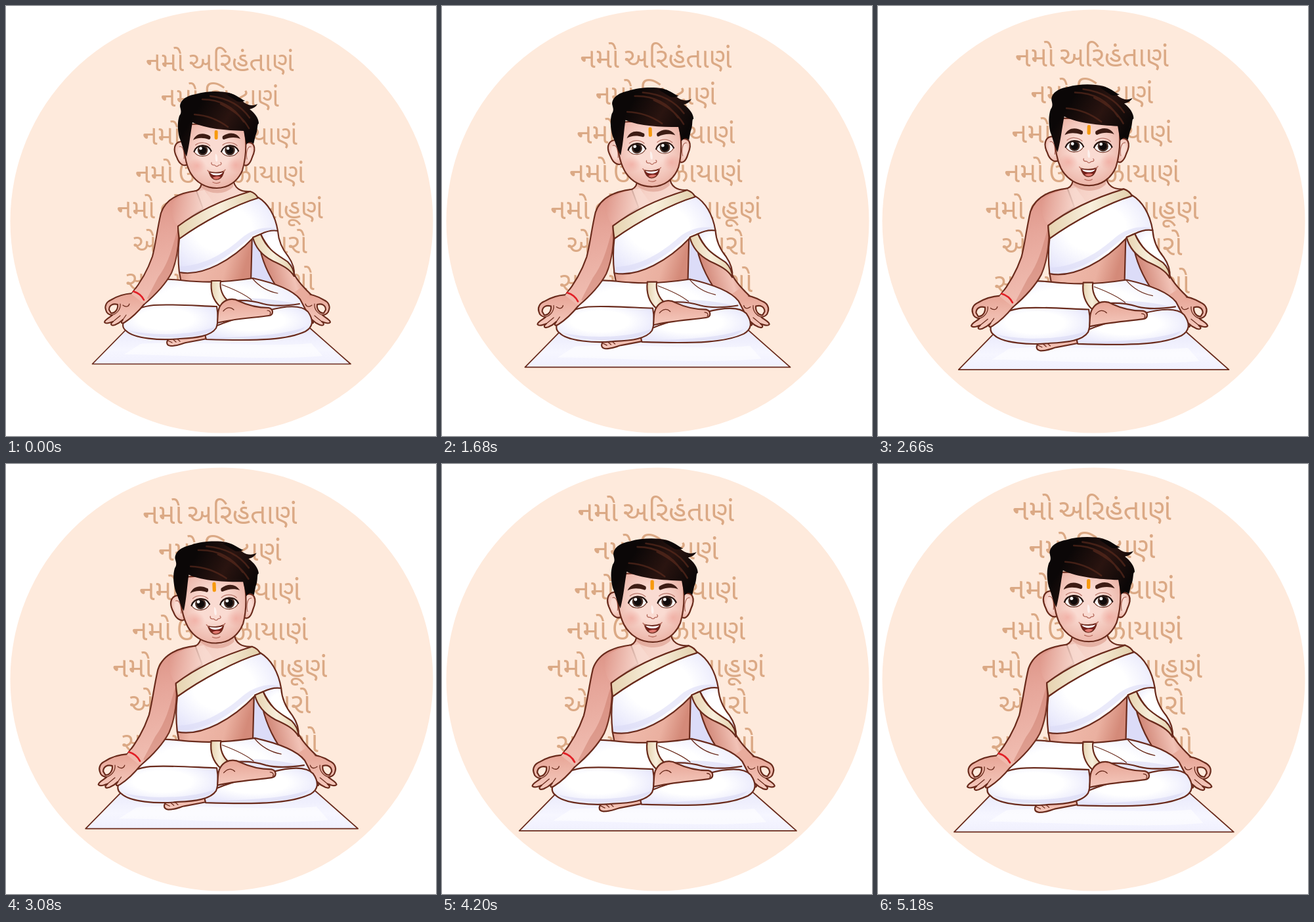
Animation, 655 px wide and 654 px high, one loop 5250 ms. Source, as an HTML page:

```html
<!DOCTYPE html>
<html lang="gu">
<head>
<meta charset="utf-8">
<title>Meditation</title>
<style>
  html, body { margin: 0; width: 100%; height: 100%; overflow: hidden; background: #fff; }
  svg { display: block; width: 100%; height: 100%; }
  #verses { font: 500 41px "Noto Sans Gujarati", "Noto Sans", sans-serif; word-spacing: -.13em; fill: #dba985; text-anchor: middle; }
  #figure { stroke: #6a2b1c; stroke-width: 2.1; stroke-linejoin: round; stroke-linecap: round; }
  .line { fill: none; }
  .thin { fill: none; stroke-width: 1.2; }
  .soft { stroke: none; }
  .cloth { fill: url(#cloth); }
  .beige { fill: url(#beige); }
  .streak { fill: none; stroke: #5d2c1e; stroke-width: 2.4; opacity: .65; }
</style>
</head>
<body>
<svg viewBox="0 0 655 654">
  <defs>
    <radialGradient id="cloth" cx=".45" cy=".42" r=".65">
      <stop offset=".45" stop-color="#fff"/><stop offset="1" stop-color="#e4e4fb"/>
    </radialGradient>
    <linearGradient id="mat" x2="0" y2="1">
      <stop stop-color="#e9e9fb"/><stop offset=".6" stop-color="#f6f6ff"/><stop offset="1" stop-color="#f0f0fe"/>
    </linearGradient>
    <linearGradient id="beige">
      <stop stop-color="#e6d3b0"/><stop offset=".5" stop-color="#f8efdc"/><stop offset="1" stop-color="#e3d0ac"/>
    </linearGradient>
    <linearGradient id="armL" x2=".15" y2="1">
      <stop stop-color="#d98d7f"/><stop offset=".4" stop-color="#e6a599"/><stop offset="1" stop-color="#f1bfb3"/>
    </linearGradient>
    <linearGradient id="armR" x1="1" x2=".1" y1=".3" y2=".6">
      <stop stop-color="#c06a5a"/><stop offset=".45" stop-color="#f2c3b7"/><stop offset="1" stop-color="#cb7c6c"/>
    </linearGradient>
    <linearGradient id="torso" x2="1" y2=".2">
      <stop stop-color="#cf8070"/><stop offset=".35" stop-color="#efb9aa"/><stop offset=".75" stop-color="#eab0a0"/><stop offset="1" stop-color="#d48a79"/>
    </linearGradient>
    <linearGradient id="chest" x2="1" y2=".3">
      <stop stop-color="#d98d7e"/><stop offset=".5" stop-color="#f6d2c7"/><stop offset="1" stop-color="#fae0d7"/>
    </linearGradient>
    <linearGradient id="glow">
      <stop stop-color="#f8d9cf" stop-opacity="0"/><stop offset=".8" stop-color="#f8d9cf"/>
    </linearGradient>
    <radialGradient id="face" cy=".45" r=".58">
      <stop offset=".4" stop-color="#fadbd2"/><stop offset="1" stop-color="#ebb2a5"/>
    </radialGradient>
    <radialGradient id="blush">
      <stop stop-color="#ee958b" stop-opacity=".45"/><stop offset="1" stop-color="#ee958b" stop-opacity="0"/>
    </radialGradient>
    <linearGradient id="hand" x2="0" y2="1">
      <stop stop-color="#e7a596"/><stop offset="1" stop-color="#f5cabe"/>
    </linearGradient>
    <linearGradient id="hair" x2="1" y2=".5">
      <stop offset=".3" stop-color="#0b0707"/><stop offset=".65" stop-color="#2a1410"/><stop offset="1" stop-color="#0b0707"/>
    </linearGradient>
    <g id="palm">
      <path fill="url(#hand)" d="M192 437C178 438 168 442 160 447C153 450 150 456 152 462C153 467 157 470 162 470C158 474 150 477 150 481C152 484 158 482 163 480C158 484 160 487 166 485C171 483 175 480 178 477C174 482 176 484 181 481C192 474 203 463 211 453"/>
      <path fill="#feeadc" d="M157 462C157 455 163 452 170 454C171 461 166 468 160 467Z"/>
      <path class="thin" d="M162 470C169 468 175 461 174 453M163 480L174 471M178 477L183 470M178 455C183 459 187 457 188 453"/>
    </g>
    <g id="eye">
      <path fill="#fff" stroke-width="1" d="M-13 2C-10 -9 8 -11 13 1C8 11 -7 12 -13 2Z"/>
      <circle class="soft" r="7.8" fill="#4a3129"/>
      <circle class="soft" r="5.6" fill="#100b0b"/>
      <circle class="soft" cx="-3" cy="-3" r="2.3" fill="#fff"/>
      <path class="line" stroke="#24130f" stroke-width="2.2" d="M-13 2C-10 -9 8 -11 13 1"/>
      <path class="thin" stroke="#b9766a" d="M-11 -8C-5 -13 5 -13 11 -7"/>
    </g>
  </defs>

  <circle cx="328.5" cy="327.5" r="322" fill="#feeadc"/>
  <g id="verses"></g>

  <g id="figure">
    <path fill="url(#mat)" stroke-width="1.7" d="M131.5 544.5H525L462 489H186Z"/>
    <path class="soft" fill="#fff" opacity=".6" d="M205 514C270 508 400 520 465 513L482 532C400 540 260 530 180 530Z"/>

    <!-- cloth behind the far arm -->
    <path fill="#dcdcf8" stroke-width="1.3" d="M372 350L390 358C396 385 408 410 432 437L373 425Z"/>

    <!-- torso and neck -->
    <path fill="url(#chest)" d="M298 262C299 272 297 278 290 281C272 286 255 292 246 304L258 350L385 300L372 282C358 283 347 278 346 262Z"/>
    <path fill="url(#torso)" d="M262 350L264 405L267 421H373L375 345Z"/>
    <path class="soft" fill="#d58f80" opacity=".5" d="M299 268C312 282 334 282 346 267V275C333 288 311 287 298 276Z"/>

    <!-- far arm -->
    <path fill="url(#armR)" d="M384 350C386 375 396 402 410 424C420 437 430 449 437 457L468 442C456 431 445 420 439 408L418 370Z"/>
    <use href="#palm" transform="matrix(-1 0 0 1 644 0)"/>
    <path class="soft" fill="#e9ac9d" d="M432 440L437 456L456 446L463 439L450 428Z"/>

    <!-- dhoti -->
    <path class="cloth" d="M230 418C248 413 265 418 290 419C320 421 350 418 376 414C403 420 435 430 448 446L458 465L440 494L190 490L199 462C214 446 222 432 230 418Z"/>
    <path class="soft" fill="#dedef7" opacity=".7" d="M338 449C375 440 415 447 447 454C420 456 390 466 370 466Z"/>
    <path class="line" d="M340 449C356 447 376 448 392 453C408 457 428 456 447 453"/>
    <path class="thin" d="M329 424C345 430 362 437 374 447M376 415C386 427 399 434 414 437"/>
    <path class="beige" d="M313 418H327C325 430 330 442 339 449L326 457C316 448 311 435 313 418Z"/>

    <!-- legs and feet -->
    <path fill="url(#hand)" d="M307 490C290 499 268 502 252 504C243 508 243 516 251 517C262 517 266 514 274 512L306 506Z"/>
    <path class="thin" d="M247 509L253 512M252 505L259 511M258 504L265 510"/>
    <path class="cloth" d="M305 507C302 499 304 494 309 491C335 480 365 470 400 463C425 456 450 454 460 465C469 478 468 488 456 495C430 507 390 510 305 507Z"/>
    <path class="soft" fill="#dadaf6" opacity=".6" d="M312 505C360 503 420 502 456 488C440 506 385 509 312 505Z"/>
    <path class="cloth" d="M197 462C179 472 173 487 183 494C195 506 235 509 265 506C290 505 312 502 320 490C324 480 323 468 321 457C290 456 250 453 225 455C212 456 203 460 197 462Z"/>
    <path class="soft" fill="#dadaf6" opacity=".6" d="M186 493C220 502 280 502 319 488C310 506 220 511 186 493Z"/>
    <path fill="url(#hand)" d="M322 482C323 470 322 462 327 455C333 446 345 443 355 449C370 456 385 459 400 459C408 461 408 470 400 471C380 474 345 476 322 482Z"/>
    <path class="thin" d="M331 464C336 458 342 457 347 462M398 463C402 463 404 466 402 469"/>

    <!-- near arm -->
    <path fill="url(#armL)" d="M290 281C264 284 243 294 236 315C230 341 228 362 223 381C215 404 204 422 191 438L210 454C228 439 244 421 252 406C259 390 262 372 263 352L262 335L300 308Z"/>
    <path class="soft" fill="#bd6555" opacity=".35" d="M262 338C254 362 250 388 232 412L212 450C230 436 246 418 252 405C259 389 262 372 263 352Z"/>
    <path class="soft" fill="url(#glow)" d="M302 280C282 283 264 287 252 300C252 318 256 331 263 334L318 302Z"/>
    <use href="#palm"/>
    <path class="soft" fill="#efbaad" d="M191 438L210 453L217 446L198 430Z"/>
    <path class="line" stroke="#e21f26" stroke-width="2.6" d="M194 434C201 436 207 441 210 447"/>

    <!-- upper cloth -->
    <path class="cloth" d="M264 354C300 328 350 302 384 291C399 300 410 318 414 342C401 342 388 346 377 352C345 386 300 412 264 405C262 388 262 370 264 354Z"/>
    <path class="soft" fill="#dcdcf7" opacity=".6" d="M266 402C310 404 345 376 376 349C389 343 401 341 412 339C395 334 375 340 360 352C335 374 305 394 266 396Z"/>
    <path class="beige" d="M264 354C263 347 262 341 262 335C296 309 336 293 372 282C378 284 382 288 384 292C350 302 300 328 264 354Z"/>
    <path class="cloth" d="M388 347C398 342 408 341 414 342C415 357 420 369 430 381C437 391 440 400 439 411C430 395 403 378 388 347Z"/>
    <path class="beige" d="M376 352L388 347C398 372 416 380 429 389C436 396 439 404 439 411C431 398 417 393 405 387C390 379 380 368 376 352Z"/>

    <g id="head">
      <path fill="url(#face)" d="M274 207C257 203 253 216 260 230C264 242 272 245 279 240Z"/>
      <path fill="url(#face)" d="M363 209C378 204 382 215 375 230C371 243 365 245 360 240Z"/>
      <path class="thin" stroke="#b26a5c" d="M264 214C269 212 272 221 271 232M373 214C368 213 365 223 367 233"/>
      <path fill="url(#face)" d="M272 180C269 210 272 236 280 252C289 269 305 277 321 277C338 277 353 267 360 250C366 230 367 205 362 178Z"/>
      <ellipse class="soft" cx="291" cy="243" rx="14" ry="12" fill="url(#blush)"/>
      <ellipse class="soft" cx="350" cy="242" rx="13" ry="12" fill="url(#blush)"/>

      <path class="soft" fill="url(#hair)" d="M275 229C269 218 268 209 264 200C261 187 261 176 264 167C268 162 266 158 265 153C265 142 277 136 289 134C305 129 326 129 340 132C350 135 356 141 363 147C370 152 377 152 383 149C380 154 376 156 371 157C379 163 385 171 385 179C382 178 384 190 380 197L377 210C372 205 369 207 366 211L362 190C335 189 305 187 284 177C281 192 280 209 275 229Z"/>
      <path class="soft" fill="#0b0707" d="M335 134C346 130 356 141 364 144C359 146 355 146 352 145Z"/>
      <path class="streak" d="M299 142C325 142 347 153 362 176M311 137C336 140 357 150 371 170M287 165C303 166 322 172 338 184M327 149C345 158 360 168 370 186"/>

      <path class="soft" fill="#3d1c14" d="M285 204C290 193 301 192 311 198C312 201 311 203 309 203C300 200 292 200 285 204Z"/>
      <path class="soft" fill="#3d1c14" d="M357 202C351 192 340 191 330 198C329 201 330 203 332 203C341 199 350 199 357 202Z"/>
      <rect class="soft" x="317.6" y="189" width="5" height="14" rx="2.2" fill="#f79a0e"/>
      <use href="#eye" x="299.5" y="219.5"/>
      <use href="#eye" x="341" y="219.5"/>
      <path class="thin" stroke="#b5695b" d="M313 238C312 242 316 242 318 242C320 245 323 244 324 242C328 242 329 240 327 238"/>
      <path class="soft" fill="#fff" opacity=".6" d="M319 225C321 224 323 231 322 236C320 238 318 236 319 225Z"/>
      <path fill="#74201b" stroke-width="1.3" d="M309 252C315 254 325 254 332 251C330 261 325 264 320 264C315 264 311 259 309 252Z"/>
      <path class="soft" fill="#fff" d="M311 253.5C318 255 325 255 330 253C328 259 314 259 311 253.5Z"/>
      <path class="soft" fill="#dd766d" d="M315 261C318 259 324 259 327 260C324 264 318 265 315 261Z"/>
      <path class="thin" stroke="#b5695b" d="M307 250L310 253M331 252L334 249M315 268C319 270 323 270 326 268"/>
    </g>
  </g>
</svg>
<script>
  const LOOP = 5250, STEP = 70, SWAY = 1400;
  const rows = [
    ["નમો અરિહંતાણં", 99], ["નમો સિદ્ધાણં", 153], ["નમો આયરિયાણં", 211],
    ["નમો ઉવજ્ઝાયાણં", 269], ["નમો લોએ સવ્વસાહૂણં", 323], ["એસો પંચ નમુક્કારો", 376],
    ["સવ્વ પાવપ્પણાસણો", 432], ["પઢમં હવઈ મંગલં", 543]
  ];
  const byId = id => document.getElementById(id);
  const verses = byId("verses"), figure = byId("figure"), head = byId("head");

  const lines = rows.map(([text, y]) => {
    const line = document.createElementNS("http://www.w3.org/2000/svg", "text");
    line.textContent = text;
    line.setAttribute("x", 326);
    line.setAttribute("y", y);
    return verses.appendChild(line);
  });

  // One type size for all verses, whichever Gujarati font is present
  const total = lines.slice(0, 7).reduce((sum, line) => sum + line.getComputedTextLength(), 0);
  verses.style.fontSize = 41 * 1766 / total + "px";

  const zoom = (el, x, y, k) =>
    el.setAttribute("transform", `translate(${x} ${y}) scale(${k}) translate(${-x} ${-y})`);

  // Part of a slow sine breath, from 0 to 1
  const breath = p => (Math.sin(2.3 * p - 1) + Math.sin(1)) / (Math.sin(1.3) + Math.sin(1));

  function draw(now) {
    const t = Math.floor(now % LOOP / STEP) * STEP;
    const p = t / (LOOP - STEP);
    zoom(verses, 326, 300, 1 + .071 * p);
    zoom(figure, 320, 360, 1 + .082 * breath(p));
    const tilt = -.8 + 1.75 * Math.cos(2 * Math.PI * (t / SWAY - .83));
    head.setAttribute("transform", `rotate(${tilt} 321 276)`);
  }

  let start;
  function tick(now) {
    start ??= now;
    draw(now - start);
    requestAnimationFrame(tick);
  }
  draw(0);
  requestAnimationFrame(tick);
</script>
</body>
</html>
```
